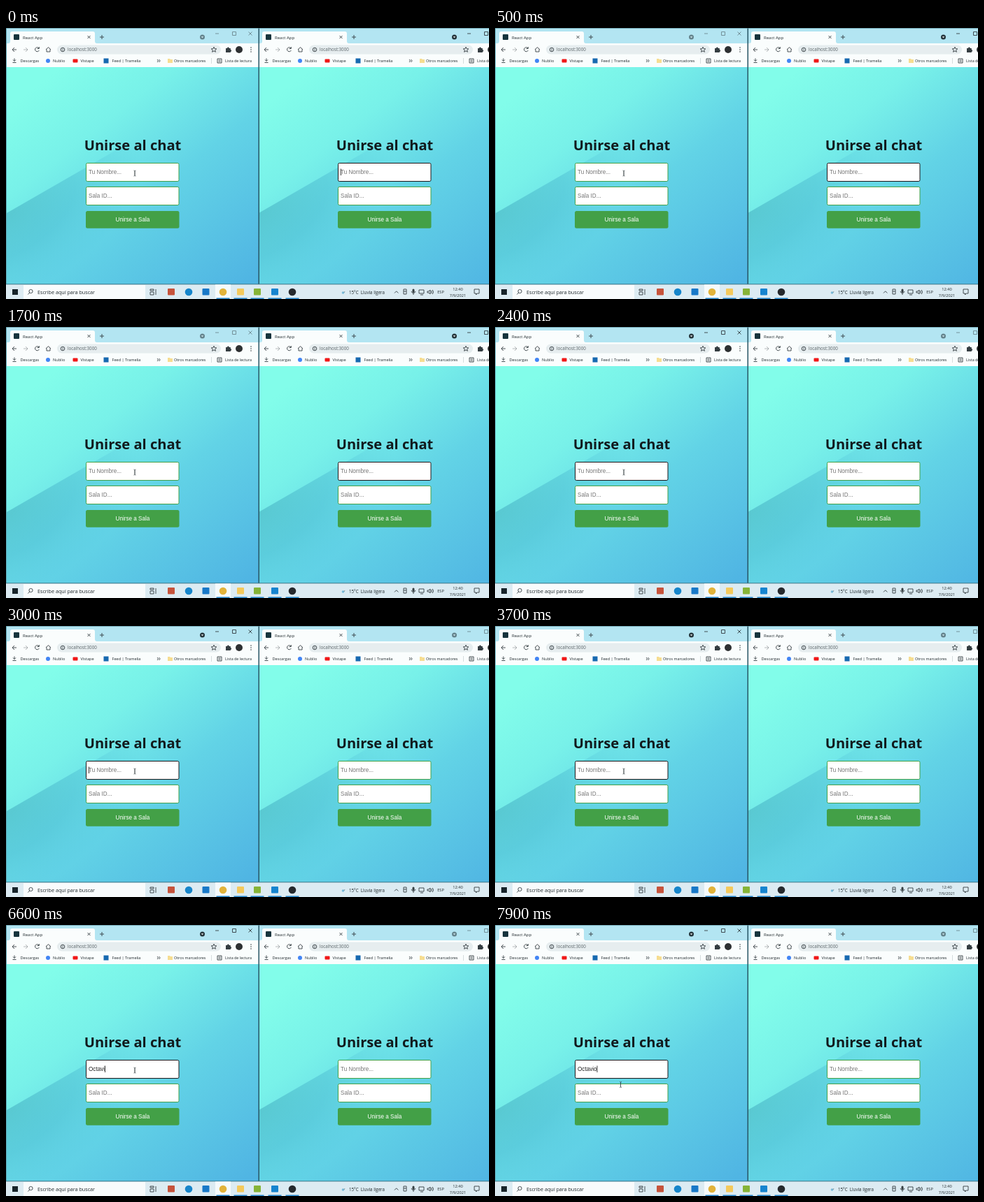
Animation of 690 by 388 pixels, one loop 8000 ms. Source, as an HTML page:

```html
<!DOCTYPE html>
<html lang="es">
<head>
<meta charset="utf-8">
<style>
html, body { margin: 0; width: 100%; height: 100%; overflow: hidden; }
svg { display: block; width: 690px; height: 388px; }
text { font-family: "Open Sans", "Noto Sans", sans-serif; fill: #1f282c; white-space: pre; }
.form text { font: 8.15px "Liberation Sans", Arial, sans-serif; }
.form .title { font: 700 20.1px "Open Sans", sans-serif; fill: #111a1d; }
.line { fill: none; stroke: #343d41; stroke-width: .9; }
</style>
</head>
<body>
<script>
const LOOP = 8000, FOCUS = 1900, NAME = "Octavio", KEY_START = 4600, KEY_STEP = 300;
const GREEN = "#43a047";

const rect = (x, y, w, h, fill, more = "") =>
  `<rect x="${x}" y="${y}" width="${w}" height="${h}" fill="${fill}" ${more}/>`;
const dot = (x, y, r, fill) => `<circle cx="${x}" cy="${y}" r="${r}" fill="${fill}"/>`;
const line = (d, more = "") => `<path class="line" d="${d}" ${more}/>`;
const label = (x, y, size, text, more = "") =>
  `<text x="${x}" y="${y}" font-size="${size}" ${more}>${text}</text>`;

const field = (id, y, hint) =>
  rect(114.5, y + .5, 132.5, 26, "#fff", `id="${id}Box" rx="1.8" stroke="${GREEN}"`) +
  `<text id="${id}Text" x="118" y="${y + 16}" style="fill:#777">${hint}</text>`;

function page(id) {
  return rect(1, 56, 360, 312, "url(#sky)") +
    `<path d="M1 265 190 156 290 368H1Z" fill="url(#fold)"/>
    <g class="form">
      <text class="title" x="181" y="175" text-anchor="middle">Unirse al chat</text>
      ${field(id + "Name", 193, "Tu Nombre...")}
      ${field(id + "Room", 227, "Sala ID...")}
      ${rect(114, 262, 133.5, 24.7, GREEN, 'rx="2.5"')}
      <text x="181" y="277" text-anchor="middle" style="fill:#fff">Unirse a Sala</text>
      ${rect(118, 201.5, .8, 9.5, "#111", `id="${id}Caret"`)}
    </g>`;
}

function browser(id, x) {
  return `<g transform="translate(${x})">
    ${rect(1, 0, 360, 24, "#b3e5f2")}
    <path d="M3 22q3 0 3-3V8q0-3 3-3H124q3 0 3 3v11q0 3 3 3Z" fill="#fafdfd"/>
    ${rect(11, 9, 8, 8, "#17343d", 'rx="1"')}
    ${label(24, 15.5, 6, "React App")}
    ${line("M116.5 11l4 4m0-4l-4 4M134 13h6m-3-3v6")}
    <g id="${id}Controls">
      ${dot(280.5, 13, 3.5, "#26363c")}
      <path d="M278.8 12.2h3.4l-1.7 2Z" fill="#fff"/>
      ${line("M299 8h5M323.5 5.5h5v5h-5ZM346.5 5.5l5 5m0-5l-5 5")}
    </g>
    ${rect(1, 22, 360, 34, "#fafdfd")}
    ${line("M15 31H9m3-3l-3 3 3 3")}
    ${line("M25 31h6m-3-3l3 3-3 3", 'opacity=".4"')}
    ${line("M47 29a3 3 0 1 0 .3 3M47.3 27v2.6h-2.6M57 31l3.5-3.5L64 31M58 30.5V34h5v-3.5")}
    ${rect(73, 24.5, 234, 13, "#e6edef", 'rx="6.5"')}
    <circle cx="81" cy="31" r="2.8" class="line"/>
    ${line("M81 30.5v2M81 29v.6")}
    ${label(88, 33.2, 6.2, "localhost:3000", 'style="fill:#596367"')}
    ${line("M297 27.2l1.1 2.5 2.7.2-2.1 1.8.7 2.6-2.4-1.4-2.4 1.4.7-2.6-2.1-1.8 2.7-.2Z")}
    <path d="M314 29h2a1.4 1.4 0 0 1 2.8 0h2v2.2a1.3 1.3 0 0 1 0 2.6V35H314Z" fill="#343d41"/>
    ${dot(333, 31, 5, "#2d3032")}
    ${[28, 31, 34].map(y => dot(350, y, .8, "#343d41")).join("")}
    ${line("M12 43.5v4m-2-2l2 2 2-2M9.5 49.5h5", 'stroke-width="1.2"')}
    ${label(20.5, 49, 5.6, "Descargas")}
    ${dot(60, 47, 3, "#4285f4")}
    ${label(67, 49, 5.6, "Nublio")}
    ${rect(95.5, 44.5, 7, 5, "#f01818", 'rx="1"')}
    ${label(106.5, 49, 5.6, "Vistape")}
    ${rect(139.5, 43.5, 7, 7, "#1769b0")}
    ${label(151.5, 49, 5.6, "Feed | Tramelia")}
    ${line("M216 45l1.7 2-1.7 2m2.5-4l1.7 2-1.7 2")}
    <path d="M231 44h3l1 1h3v5h-7Z" fill="#f6dd91"/>
    ${label(240, 49, 5.4, "Otros marcadores")}
    ${rect(293, 43, .7, 8, "#c5cdd0")}
    ${line("M302 44h6v6h-6Zm1.5 2h3m-3 2h3")}
    ${label(313, 49, 5.4, "Lista de lectura")}
    ${page(id)}
  </g>`;
}

function taskbar() {
  const icons = [[236, "#c6533b"], [261, "#1685ca"], [285.5, "#1878c8"], [310, "#e2b33b"],
    [335, "#f4c95c"], [359, "#86b437"], [384, "#1684cf"], [409, "#25292d"]];
  const square = [0, 2, 4, 5, 6];
  const drawIcon = ([x, color], i) =>
    (square.includes(i) ? rect(x - 5, 373, 10, 9.5, color, 'rx="1"') : dot(x, 378, 5.3, color)) +
    (i > 2 ? rect(x - 9.5, 386.5, 19, 1.5, "#2383c9") : "");
  return rect(0, 367, 690, 21, "#dcebf2") +
    rect(0, 366.3, 690, 1, "#3f7889") +
    rect(9, 374, 8, 8, "#17242a") +
    rect(25, 368, 174, 20, "#f8fbfc") +
    `<circle cx="35.5" cy="377" r="2.6" class="line"/>` +
    line("M33.7 379l-2.4 2.5") +
    label(45, 380.6, 7.2, "Escribe aquí para buscar") +
    line("M206 374h5v2h-5ZM206 378h5v4h-5ZM214 374v8") +
    rect(299, 367.3, 22, 20, "#f5fafc") +
    icons.map(drawIcon).join("") +
    dot(481.5, 379, 1.8, "#79bad9") + line("M484 377l-1 2", 'opacity=".5"') +
    label(490, 380.5, 6.2, "15°C  Lluvia ligera") +
    line("M555 379.5l2.7-2.7 2.7 2.7M568 374h4v7h-4Zm0 3h4M590 375h7v5h-7Zm2 7h4M602 377h2l2-2v6l-2-2h-2ZM607.5 376q1.5 2 0 4m1.8-5q2.5 3 0 6") +
    rect(580.5, 373.5, 3, 5.5, "#343d41", 'rx="1.5"') + line("M579 377q3 6 6 0m-3 3v2") +
    label(621, 380, 5.6, "ESP", 'text-anchor="middle"') +
    label(645.5, 376, 5.6, "12:40", 'text-anchor="middle"') +
    label(645.5, 385, 5.6, "7/9/2021", 'text-anchor="middle"') +
    line("M669 374h7v6h-3l-1.5 2v-2H669Z");
}

document.body.innerHTML = `<svg viewBox="0 0 690 388">
  <defs>
    <linearGradient id="sky" gradientUnits="userSpaceOnUse" x1="60" y1="70" x2="310" y2="390">
      <stop stop-color="#82fdea"/><stop offset=".25" stop-color="#78f1e9"/>
      <stop offset=".55" stop-color="#62d3e6"/><stop offset="1" stop-color="#50b5e3"/>
    </linearGradient>
    <radialGradient id="fold" gradientUnits="userSpaceOnUse" cx="0" cy="0" r="1"
      gradientTransform="translate(1 265) rotate(-30) scale(215 115)">
      <stop stop-color="#3da5ba" stop-opacity=".5"/>
      <stop offset=".5" stop-color="#3fabc9" stop-opacity=".36"/>
      <stop offset="1" stop-color="#48b4d8" stop-opacity="0"/>
    </radialGradient>
  </defs>
  ${browser("left", 0)}${browser("right", 360)}
  ${rect(0, 0, 1, 367, "#5da5b3")}${rect(360.5, 0, 1.5, 367, "#285766")}
  ${rect(0, 0, 690, .7, "#568b99")}
  ${taskbar()}
  <path id="pointer" class="line" opacity=".75" d="M-1.5-4q1.5 0 1.5 1V3q0 1-1.5 1M1.5-4Q0-4 0-3V3q0 1 1.5 1"/>
</svg>`;

const get = id => document.getElementById(id);
const leftText = get("leftNameText"), pointer = get("pointer");

function setFocus(id, focused, caretOn) {
  get(id + "NameBox").setAttribute("stroke", focused ? "#1c1719" : GREEN);
  get(id + "Controls").setAttribute("opacity", focused ? 1 : .55);
  get(id + "Caret").setAttribute("opacity", focused && caretOn ? 1 : 0);
}

function draw() {
  const t = Math.floor(performance.now() % LOOP / 100) * 100;
  const keys = Math.max(0, Math.min(NAME.length, Math.floor((t - KEY_START) / KEY_STEP)));
  const lastAction = keys ? KEY_START + keys * KEY_STEP : t < FOCUS ? 0 : FOCUS;
  const caretOn = (t - lastAction) % 1000 < 500;

  setFocus("left", t >= FOCUS, caretOn);
  setFocus("right", t < FOCUS, caretOn);
  leftText.textContent = keys ? NAME.slice(0, keys) : "Tu Nombre...";
  leftText.style.fill = keys ? "#222" : "#777";
  get("leftCaret").setAttribute("x", 118 + (keys ? leftText.getComputedTextLength() : 0));

  const p = Math.max(0, Math.min(1, (t - 7500) / 400)), ease = p * p * (3 - 2 * p);
  pointer.setAttribute("transform", `translate(${184 - 4.5 * ease} ${208 + 20.5 * ease})`);
  requestAnimationFrame(draw);
}
draw();
</script>
</body>
</html>
```
